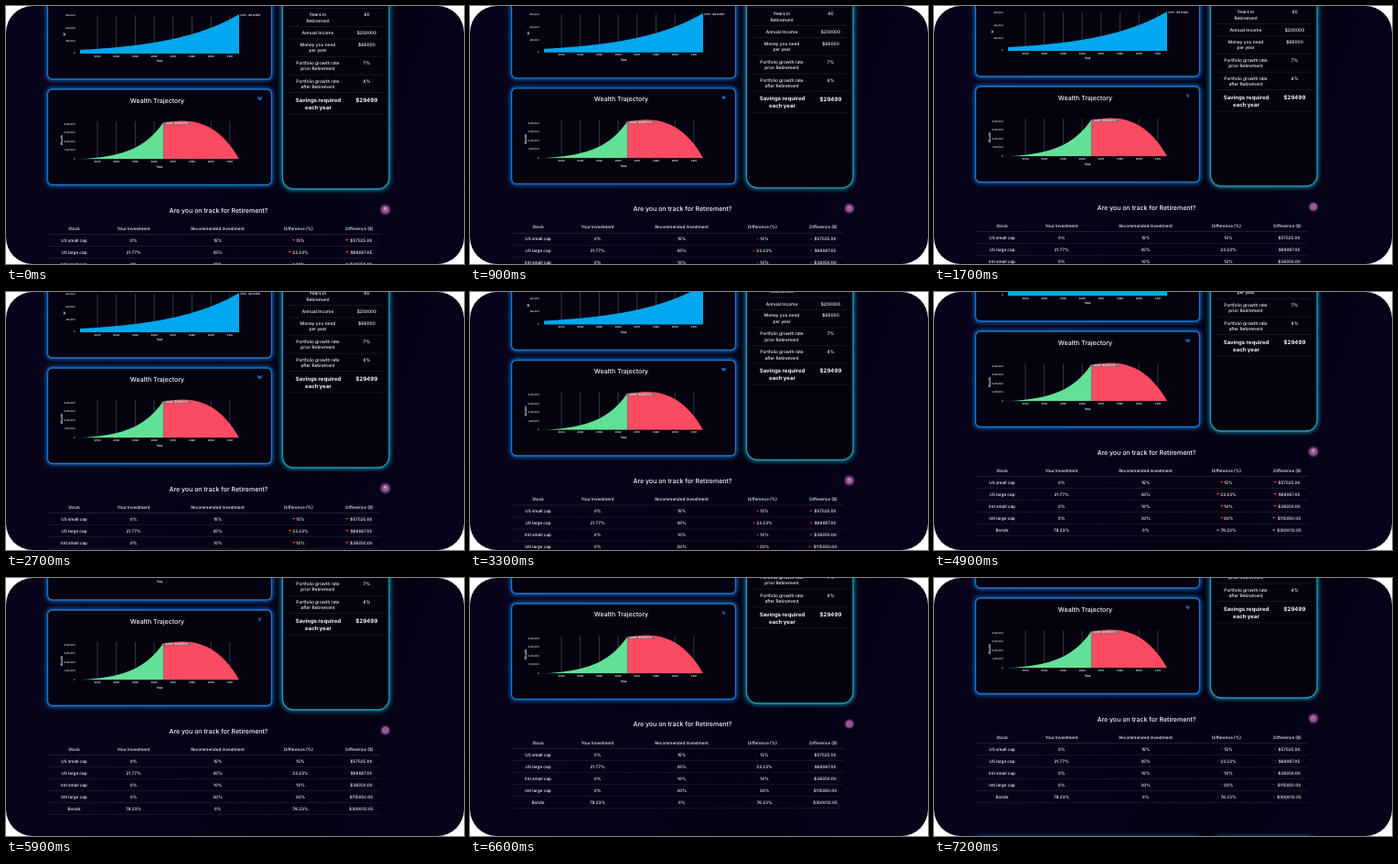
Animation of 501x282 px, one loop 7300 ms. Source, as an HTML page:

```html
<!DOCTYPE html>
<html lang="en">
<head>
<meta charset="utf-8">
<title>Retirement dashboard</title>
<style>
html, body { margin: 0; width: 100%; height: 100%; overflow: hidden; background: #fff; }
svg { display: block; width: 100vw; height: 100vh; }
text { font-family: Inter, "Open Sans", sans-serif; text-rendering: geometricPrecision; }
</style>
</head>
<body>
<svg id="stage" viewBox="0 0 501 282">
  <defs>
    <clipPath id="card"><rect width="501" height="282" rx="29"/></clipPath>
    <linearGradient id="night" x1="0" y1="0" x2="1" y2="0.2">
      <stop offset="0" stop-color="#09041c"/>
      <stop offset=".4" stop-color="#060317"/>
      <stop offset=".8" stop-color="#050213"/>
      <stop offset="1" stop-color="#070319"/>
    </linearGradient>
    <filter id="glow" filterUnits="userSpaceOnUse" x="20" y="-150" width="430" height="620">
      <feGaussianBlur stdDeviation="2"/>
    </filter>
    <radialGradient id="halo">
      <stop offset="0" stop-color="#b66fbd"/>
      <stop offset=".55" stop-color="#87498f" stop-opacity=".85"/>
      <stop offset="1" stop-color="#6a3588" stop-opacity="0"/>
    </radialGradient>
  </defs>
  <g clip-path="url(#card)">
    <rect width="501" height="282" fill="url(#night)"/>
    <g id="page"></g>
  </g>
</svg>
<script>
const NS = 'http://www.w3.org/2000/svg';
const LOOP = 7300, STEP = 100;
const page = document.getElementById('page');

function add(tag, attrs, parent = page) {
  const el = document.createElementNS(NS, tag);
  for (const k in attrs) el.setAttribute(k, attrs[k]);
  parent.appendChild(el);
  return el;
}

// y is the vertical middle of the lettering
function label(str, x, y, size, opts = {}, parent = page) {
  const el = add('text', {
    x, y: y + size * 0.36, 'font-size': size, fill: '#f8f8fb',
    'text-anchor': 'middle', 'font-weight': 500, ...opts
  }, parent);
  el.textContent = str;
  return el;
}

function rule(x1, x2, y, alpha = 0.15) {
  add('path', { d: `M${x1} ${y}H${x2}`, stroke: '#fff', 'stroke-opacity': alpha, 'stroke-width': 0.5 });
}

function panel(x, y, width, height, rx, color, soft) {
  const box = { x, y, width, height, rx };
  add('rect', { ...box, fill: 'none', stroke: soft, 'stroke-width': 4, filter: 'url(#glow)' });
  add('rect', { ...box, fill: '#04020f', stroke: color, 'stroke-width': 1.3 });
}

function curve(x0, x1, base, height) {
  let d = `M${x0} ${base}`;
  for (let x = x0; x <= x1; x++) d += `L${x} ${(base - height(x - x0)).toFixed(2)}`;
  return d + `V${base}Z`;
}

function axes(top, base, ticks, name, nameX) {
  const bold = { 'font-weight': 600 };
  for (let i = 0; i < 8; i++) {
    const x = 100 + i * 20.7;
    add('path', { d: `M${x} ${top}V${base}`, stroke: '#fff', 'stroke-opacity': 0.35, 'stroke-width': 0.6 });
    label(2030 + i * 10, x, base + 2.6, 2.7, bold);
  }
  ticks.forEach(([str, y]) => label(str, 75.5, y, 2.4, { ...bold, 'text-anchor': 'end' }));
  label('Year', 168, base + 8.3, 3.3, bold);
  const mid = (top + base) / 2;
  label(name, nameX, mid, 3.3, { ...bold, transform: `rotate(-90 ${nameX} ${mid})` });
}

const BLUE = '#1c78cc', BLUE_SOFT = '#0f57ab', CYAN = '#1f9bb4', CYAN_SOFT = '#10748f';

// Income chart
panel(45.5, -60, 245, 140, 5, BLUE, BLUE_SOFT);
axes(10, 52, [['800,000', 10.5], ['600,000', 24], ['400,000', 38], ['0', 51.5]], 'W', 64);
add('path', { d: curve(81, 255, 52, u => 4 * Math.exp(0.01365 * u)), fill: '#00a7ee' });
label('2105 : $814398', 256, 10, 3, { 'text-anchor': 'start' });

// Wealth chart
panel(45.5, 91, 245, 104.5, 5, BLUE, BLUE_SOFT);
label('Wealth Trajectory', 165.5, 103, 7);
axes(126, 167.3, [4, 3, 2, 1, 0].map((n, i) => [n ? n + ',000,000' : '0', 129 + i * 9.5]), 'Wealth', 61);
const grown = u => 40 * (Math.exp(0.035 * u) - 1) / (Math.exp(0.035 * 91) - 1);
add('path', { d: curve(81, 172, 167.3, grown), fill: '#62e196' });
add('path', { d: 'M172 167.3V128C206 120.5 233 129 255 167.3Z', fill: '#fa4b62' });
add('path', { d: 'M172.3 127V167.3', stroke: '#777', 'stroke-width': 0.9 });
add('path', { d: 'M81 167.6H255', stroke: '#111', 'stroke-width': 0.9, 'stroke-dasharray': '2 1.5' });
add('rect', { x: 173, y: 126.6, width: 30, height: 3.6, fill: '#777', 'fill-opacity': 0.5 });
label('2065 : $4194712', 174.5, 128.4, 3, { 'text-anchor': 'start' });
const chevron = add('path', {
  d: 'M-2.2 -1.4L0 .3L2.2 -1.4M-2.2 .1L0 1.8L2.2 .1',
  fill: 'none', stroke: '#1673d6', 'stroke-width': 1.1
});

// Summary
panel(302.5, -60, 116.5, 260, 12, CYAN, CYAN_SOFT);
[
  [9.5, '40', 'Years in', 'Retirement'],
  [29.5, '$200000', 'Annual Income'],
  [42, '$68000', 'Money you need', 'per year'],
  [62, '7%', 'Portfolio growth rate', 'prior Retirement'],
  [82, '4%', 'Portfolio growth rate', 'after Retirement']
].forEach(([y, value, ...lines]) => {
  lines.forEach((line, i) => label(line, 341, y + i * 6.7, 4.85));
  label(value, 394.5, y, 4.85);
});
const strong = { 'font-weight': 700 };
label('Savings required', 341.5, 102.5, 6, strong);
label('each year', 341.5, 110.5, 6, strong);
label('$29499', 394.5, 102.5, 6.1, strong);
[2.5, 22.5, 35.8, 55.3, 75.2, 94.5, 118].forEach(y => rule(308, 413, y));

// Table
label('Are you on track for Retirement?', 232.5, 223, 7);
const cols = [74.5, 139.5, 231.5, 320, 386.5];
['Stock', 'Your Investment', 'Recommended Investment', 'Difference (%)', 'Difference ($)']
  .forEach((str, i) => label(str, cols[i], 243, 4.6));
rule(46, 409, 249.5, 0.2);
const arrows = [];
[
  ['US small cap', '0%', '15%', '15%', '$57525.00'],
  ['US large cap', '21.77%', '45%', '23.23%', '$89087.05'],
  ['Intl small cap', '0%', '10%', '10%', '$38350.00'],
  ['Intl large cap', '0%', '30%', '30%', '$115050.00'],
  ['Bonds', '78.23%', '0%', '78.23%', '$300012.05']
].forEach((row, r) => {
  const y = 256 + r * 13, up = r === 4;
  row.forEach((str, c) => {
    const diff = c > 2;
    label(str, cols[c] + (diff ? 2 : 0), y, 4.6);
    if (!diff) return;
    const x = cols[c] - str.length * 1.36 - 1.2;
    const el = add('path', {
      d: up ? 'M-1.8 1.1H1.8L0 -1.2Z' : 'M-1.8 -1.1H1.8L0 1.2Z',
      fill: up ? '#5f8f8c' : '#f0303c'
    });
    arrows.push({ el, x, y });
  });
  rule(46, 409, y + 6.5);
});

// Help badge
const badge = add('g', { transform: 'translate(415 222.5)' });
const halo = add('circle', { r: 7, fill: 'url(#halo)' }, badge);
add('circle', { r: 3.8, fill: '#9a5592' }, badge);
const mark = label('?', 0, 0, 5.2, strong, badge);

// Next row of panels, just under the fold
panel(45.5, 353, 245, 100, 5, BLUE, BLUE_SOFT);
panel(302.5, 353, 116.5, 100, 12, CYAN, CYAN_SOFT);

// Scroll keys: time, offset, speed per second
const keys = [
  [0, 0, 0.6], [1700, 3, 2.6], [2700, 8, 9], [3900, 28, 19],
  [4900, 48, 12], [5900, 56, 9], [7200, 69, 9], [7300, 69.5, 5]
];

function scrollAt(t) {
  let i = 0;
  while (i < keys.length - 2 && t >= keys[i + 1][0]) i++;
  const [t0, p0, v0] = keys[i], [t1, p1, v1] = keys[i + 1];
  const h = (t1 - t0) / 1000, s = (t - t0) / (t1 - t0), q = 1 - s;
  return p0 * (1 + 2 * s) * q * q + h * v0 * s * q * q
       + p1 * s * s * (3 - 2 * s) - h * v1 * s * s * q;
}

function draw(ms) {
  const t = Math.floor((ms % LOOP) / STEP) * STEP;
  page.setAttribute('transform', `translate(0 ${-scrollAt(t).toFixed(2)})`);
  const turn = Math.sin(Math.PI * (t - 1700) / 700), open = Math.abs(turn);
  arrows.forEach(({ el, x, y }) => {
    el.setAttribute('transform', `translate(${x} ${y}) scale(1 ${0.2 + 0.7 * open})`);
    el.setAttribute('opacity', 0.35 + 0.65 * open);
  });
  chevron.setAttribute('transform', `translate(277.5 100.8) scale(${0.6 + 0.5 * open} 1)`);
  mark.setAttribute('transform', `scale(${turn} 1)`);
  halo.setAttribute('r', 6.2 + 0.8 * open);
}

const start = performance.now();
function tick() {
  draw(performance.now() - start);
  requestAnimationFrame(tick);
}
draw(0);
requestAnimationFrame(tick);
</script>
</body>
</html>
```
